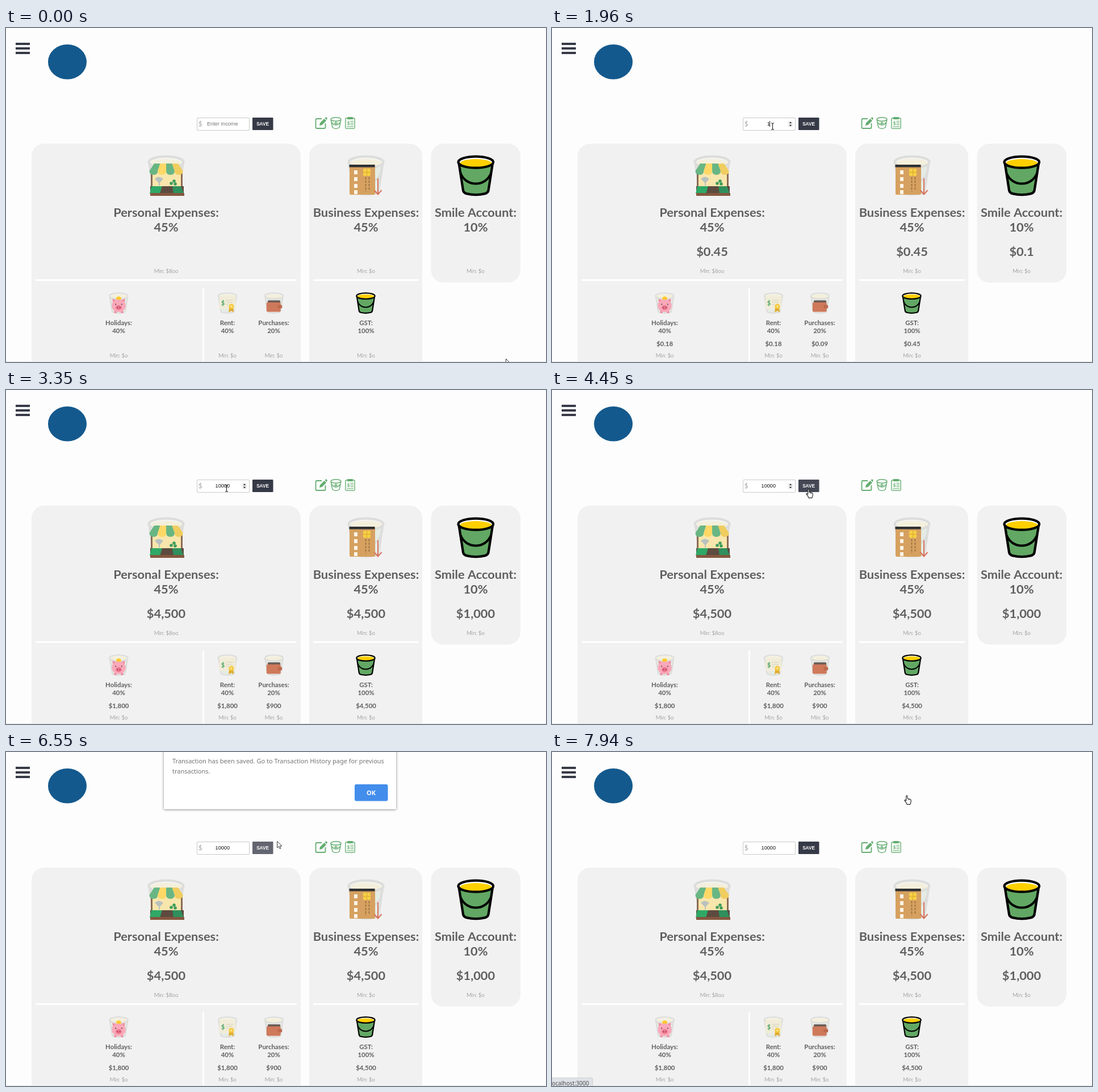
Recreate the animation shown at these times as an HTML page with a canvas. Size 951 by 589 pixels, loop 8 s.

```html
<!DOCTYPE html>
<html lang="en">
<head>
<meta charset="utf-8">
<title>Income buckets</title>
<style>
html, body { margin: 0; width: 100%; height: 100%; overflow: hidden; background: #fdfdfd; }
canvas { display: block; }
</style>
</head>
<body>
<canvas id="stage" width="951" height="589"></canvas>
<script>
const c = document.getElementById('stage').getContext('2d');
const LOOP = 8000;
const DARK = '#363a47', GREEN = '#62a864', INK = '#5f5f5f', PAGE = '#fdfdfd';
const HEAD = 'Lato, sans-serif', FORM = '"Liberation Sans", Arial, sans-serif', NOTE = '"Noto Sans", sans-serif';

// ---- helpers ----
function rect(x, y, w, h, color, r = 0) {
  c.fillStyle = color;
  c.beginPath();
  c.roundRect(x, y, w, h, r);
  c.fill();
}
function oval(x, y, rx, ry, color) {
  c.fillStyle = color;
  c.beginPath();
  c.ellipse(x, y, rx, ry, 0, 0, 7);
  c.fill();
}
function shape(d, fill, stroke, width = 1) {
  const p = new Path2D(d);
  if (fill) { c.fillStyle = fill; c.fill(p); }
  if (stroke) { c.strokeStyle = stroke; c.lineWidth = width; c.stroke(p); }
}
function text(s, x, y, font, color, align = 'center') {
  c.font = font;
  c.fillStyle = color;
  c.textAlign = align;
  c.fillText(s, x, y);
}
function at(x, y, scale, draw) {
  c.save();
  c.translate(x, y);
  c.scale(scale, scale);
  draw();
  c.restore();
}

// ---- icons, on a 66 x 72 grid ----
function bucket(line, body, rim, fill) {
  c.lineJoin = 'round';
  shape('M3.5 14L11 62Q12 66 17 67.5Q33 71.5 49 67.5Q54 66 55 62L62.5 14Z', body, line, 4.2);
  shape('M6.5 32C16 56 50 56 59.5 32', null, line, 4);
  oval(33, 12.5, 30.5, 10, rim);
  oval(33, 14.5, 28, 7.5, fill);
  shape('M2.5 12.5A30.5 10 0 0 1 63.5 12.5A30.5 10 0 0 1 2.5 12.5Z', null, line, 4.2);
}
const fullBucket = () => bucket('#000', GREEN, '#fff', '#ffd000');
const fadedBucket = () => bucket('#dcdddb', '#e5ebe4', '#f3f3f0', '#f3efdb');

function shop() {
  fadedBucket();
  rect(8, 30, 52, 37, '#f8e6ac');
  rect(6, 30, 3, 37, '#8a6b55');
  rect(59, 30, 3, 37, '#8a6b55');
  shape('M13 42Q20 35 28 42L21 50ZM20 48h2v6h-2Z', '#b9c2c0');
  for (const [x, y] of [[42, 50], [47, 46], [49, 51]]) oval(x, y, 2.8, 2.8, '#3f9d5c');
  rect(5, 55, 59, 13, '#5d4b40');
  shape('M7 55H26L22 68H4Z', '#2fa866');
  shape('M44 55H59L64 68H46Z', '#2f8f5c');
  rect(5, 67, 60, 5, '#85573f');
  for (let i = 0; i < 4; i++) {
    const a = 3.5 + i * 14.8, top = 12 + i * 10.5;
    shape(`M${top} 15H${top + 10.5}L${a + 14.8} 28Q${a + 14.8} 35 ${a + 7.4} 35Q${a} 35 ${a} 28Z`,
      i % 2 ? (i > 2 ? '#f0cd5f' : '#ffd866') : '#68b683');
  }
}
function card() {
  fadedBucket();
  rect(4, 17, 45, 53, '#d6a160', 2);
  rect(3.5, 17, 45, 4.5, '#2f3032');
  rect(28, 24, 13, 13, '#f6cf45', 2);
  shape('M28 30.5H41M34.5 24V37', null, '#d8a92f');
  for (const y of [27, 39, 51, 62]) rect(12, y, 6, 7, '#fbf3e6');
  c.setLineDash([4, 2]);
  shape('M32.5 39V64M38.5 39V62', null, '#8d673a', 1.4);
  c.setLineDash([]);
  shape('M54 41V69M47.5 62L54 69.5L60.5 62', null, '#d8735c', 2);
}
function pig() {
  fadedBucket();
  oval(33, 21, 8, 7, '#ffc928');
  shape('M12 22L24 25L14 37ZM54 22L42 25L52 37Z', '#f08ca2');
  rect(18, 60, 8, 10, '#f08ca2', 3);
  rect(40, 60, 8, 10, '#f08ca2', 3);
  oval(33, 45, 23, 21, '#f9a9ba');
  oval(33, 51, 10, 8, '#ee7890');
  oval(29, 51, 2, 3, '#a8455c');
  oval(37, 51, 2, 3, '#a8455c');
  oval(23, 40, 2, 2, '#5b3a42');
  oval(43, 40, 2, 2, '#5b3a42');
}
function lease() {
  fadedBucket();
  rect(6, 14, 54, 42, '#f0ecd8', 4);
  shape('M28 27H52M28 34H50M28 41H36', null, '#d3cfb8', 2);
  text('$', 18, 43, '700 20px ' + HEAD, '#3f9d5c');
  shape('M39 50L37 67L46 62L54 67L52 50Z', '#e0ac2e');
  oval(46, 47, 8.5, 8.5, '#f5c83a');
  oval(46, 47, 4, 4, '#fbe083');
}
function wallet() {
  fadedBucket();
  rect(12, 27, 42, 12, '#6d5d58', 3);
  rect(8, 34, 47, 31, '#cf795b', 4);
  rect(45, 42, 15, 12, '#bd6a50', 4);
}

function toolIcons() {
  const tint = '#64ac70';
  c.lineJoin = 'round';
  shape('M556 160H547.5Q545.5 160 545.5 162V175Q545.5 177 547.5 177H560.5Q562.5 177 562.5 175V168', null, tint, 1.8);
  shape('M552 172L553 167.5L560.5 160L564 163.5L556.5 171ZM561.5 159L563 157.5Q565 157 565.5 158.5Q566 160 565 161.5L564.7 162.2Z', tint);
  shape('M572 161A9 3.2 0 0 1 590 161A9 3.2 0 0 1 572 161L575 175.5Q581 179.5 587 175.5L590 161M573 166Q581 176 589 166M581 164.5V171M577.8 167.8H584.2', null, tint, 1.4);
  shape('M599.5 159H612.5Q614.2 159 614.2 161V175.5Q614.2 177.3 612.5 177.3H599.5Q597.8 177.3 597.8 175.5V161Q597.8 159 599.5 159Z', '#f4faf4', tint, 1.3);
  rect(601, 157, 10, 4, tint, 1);
  shape('M606.5 164.5H612M606.5 167.5H612M606.5 170.5H612M600.5 174H612', null, tint, 1.2);
  text('$', 603, 170.5, '700 8px ' + HEAD, tint);
}

// ---- timeline ----
function stepped(t, t0, t1, n) {
  if (t < t0) return 0;
  if (t1 === t0) return 1;
  return Math.min(1, (Math.floor((t - t0) / (t1 - t0) * (n - 1) + 1e-6) + 1) / n);
}
const ease = p => p * p * (3 - 2 * p);

// start, end, steps, x, y, pointer
const MOVES = [
  [70, 770, 10, 394, 181, 'arrow'],
  [940, 1000, 2, 390, 173, 'beam'],
  [1170, 1240, 2, 388.5, 173.5, 'beam'],
  [3900, 3960, 2, 453, 184, 'arrow'],
  [4130, 4290, 3, 447, 174, 'hand'],
  [5380, 5380, 1, 447, 172, 'hand'],
  [6460, 7040, 8, 640, 76, 'arrow'],
  [7110, 7180, 2, 643, 70, 'hand'],
  [7250, 7250, 1, 642, 71, 'hand'],
  [7330, 7410, 2, 626, 72, 'hand'],
  [7650, 7650, 1, 625, 73, 'hand'],
  [7940, 7940, 1, 620, 76, 'hand']
];
const KEYS = [1960, 2190, 2340, 2650, 2800];

const POINTERS = {
  arrow() { shape('M.5 .5V12L3.2 9.5L5 13.6L6.9 12.8L5.1 8.8H8.8Z', '#fff', '#222', 0.9); },
  beam() { shape('M-2.5 -5.5H-.8L0 -5L.8 -5.5H2.5M0 -5V5M-2.5 5.5H-.8L0 5L.8 5.5H2.5', null, '#222', 1.1); },
  hand() {
    shape('M3.7 1.6Q4.8 -.2 5.9 1.6V6L10.7 7.2Q12.3 7.8 12.2 9.3V12L10.8 16.4H5L4 13.7L.9 9.7Q1 7.8 2.5 8.8L3.7 10Z', '#fff', '#222', 1.1);
    shape('M8 7V9M10.2 7.5V9.2', null, '#222', 0.8);
  }
};

function pointer(t) {
  let x = 880, y = 583, kind = 'arrow';
  for (const [t0, t1, n, tx, ty, k] of MOVES) {
    if (t < t0) break;
    let p = stepped(t, t0, t1, n);
    if (n > 2) p = ease(p);
    x += (tx - x) * p;
    y += (ty - y) * p;
    kind = k;
  }
  at(x, y, 1, POINTERS[kind]);
}

// ---- page parts ----
const money = v => '$' + v.toLocaleString('en-US', { maximumFractionDigits: 2 });

function account(x, name, share, income, min) {
  const font = '700 21.8px ' + HEAD;
  text(name + ':', x, 333, font, INK);
  text(share * 100 + '%', x, 359, font, INK);
  if (income) text(money(income * share), x, 402, font, INK);
  text('Min: $' + min, x, 432, '300 9.5px ' + HEAD, '#666');
}
function subAccount(x, name, share, parent, income) {
  const font = '700 11.4px ' + HEAD;
  text(name + ':', x, 523.5, font, INK);
  text(share * 100 + '%', x, 537.5, font, INK);
  if (income) text(money(income * parent * share), x, 560.5, font, INK);
  text('Min: $o', x, 580.5, '300 9.5px ' + HEAD, '#666');
}

function board(income) {
  rect(45, 204, 474, 420, '#f1f1f1', 22);
  rect(534, 204, 199, 420, '#f1f1f1', 22);
  rect(748.5, 204, 157.5, 245, '#f1f1f1', 22);
  rect(52, 443, 460, 3, '#fff');
  rect(541, 443, 186, 3, '#fff');
  rect(346, 459, 3, 130, '#fff');

  at(249, 224, 1, shop);
  at(601, 224, 1, card);
  at(794, 224, 1.01, fullBucket);
  at(181, 466, 0.53, pig);
  at(372.5, 466, 0.53, lease);
  at(454.5, 466, 0.53, wallet);
  at(616, 466, 0.53, fullBucket);

  account(282, 'Personal Expenses', 0.45, income, '8oo');
  account(634, 'Business Expenses', 0.45, income, 'o');
  account(827, 'Smile Account', 0.1, income, 'o');
  subAccount(198.5, 'Holidays', 0.4, 0.45, income);
  subAccount(390, 'Rent', 0.4, 0.45, income);
  subAccount(471.5, 'Purchases', 0.2, 0.45, income);
  subAccount(634, 'GST', 1, 0.45, income);
  rect(0, 588, 951, 1, '#e6e6e6');
}

function saveAlpha(t) {
  if (t < 4380 || t >= 7410) return 1;
  if (t >= 6460) return 0.77;
  return 1 - 0.3 * Math.min(1, (t - 4380) / 300);
}

function incomeForm(t, value) {
  const font = '9.2px ' + FORM;
  rect(336, 158, 93, 23, '#c9c9c9', 2);
  rect(337, 159, 91, 21, '#fff', 1);
  text('$', 338.5, 172.5, '300 12.5px ' + HEAD, '#666', 'left');
  text(value || 'Enter Income', 381.3, 172, font, value ? '#111' : '#757575');

  const caretOn = (t >= 1240 && t < 1720) || (t >= 1960 && t < 3350) || (t >= 3900 && t < 4300);
  if (caretOn) {
    c.font = font;
    rect(Math.round(381.3 + c.measureText(value).width / 2 - 0.5), 164, 1, 10, '#222');
  }
  if (t >= 940 && t < 4830) {
    rect(415.5, 164, 9, 10.5, '#efefef');
    shape('M417.7 168L420 165.3L422.3 168ZM417.7 170.7L420 173.4L422.3 170.7Z', '#333');
  }

  c.globalAlpha = saveAlpha(t);
  rect(434, 158, 36.5, 22, DARK, 1);
  c.globalAlpha = 1;
  text('SAVE', 452, 172, '700 8.2px ' + FORM, '#fff');
}

// Shadow is clipped to the outside so a fading panel stays white.
function panel(x, y, w, h) {
  c.save();
  c.beginPath();
  c.rect(0, -100, 951, 689);
  c.rect(x, y, w, h);
  c.clip('evenodd');
  c.shadowColor = 'rgba(0,0,0,.5)';
  c.shadowBlur = 4;
  c.shadowOffsetY = 1;
  rect(x, y, w, h, '#fff', 2);
  c.restore();
  rect(x, y, w, h, '#fff', 2);
}

function dialog(t) {
  if (t < 6070 || t >= 7410) return;
  const [dy, alpha, scale] =
    t < 6150 ? [-6, 0.34, 1.005] :
    t < 6230 ? [2, 0.8, 1.002] :
    t < 7330 ? [0, 1, 1] : [-3, 0.4, 1.003];
  c.save();
  c.globalAlpha = alpha;
  c.translate(482.5, dy);
  c.scale(scale, scale);
  c.translate(-482.5, 0);
  panel(278, -40, 409, 140.5);
  const font = '11px ' + NOTE;
  text('Transaction has been saved. Go to Transaction History page for previous', 293, 19.8, font, '#747474', 'left');
  text('transactions.', 293, 38, font, '#747474', 'left');
  rect(614, 57, 58.5, 29.5, '#438dec', 3);
  text('OK', 643, 75.8, '600 11px ' + NOTE, '#fff');
  c.restore();
}

function statusBar(t) {
  if (t < 7410) return;
  rect(-5, 574, 77, 20, '#cfd2d6', 3);
  rect(-5, 575, 76, 20, '#dfe2e6', 3);
  text('localhost:3000', -2.6, 588, '10px ' + NOTE, '#4a4d52', 'left');
}

function draw(t) {
  const typed = KEYS.filter(k => t >= k).length;
  const value = '10000'.slice(0, typed);
  rect(0, 0, 951, 589, PAGE);
  for (const y of [26, 34, 42]) rect(17, y, 25, 4, DARK);
  oval(108, 59.7, 34, 30.8, '#14598d');
  incomeForm(t, value);
  toolIcons();
  board(Number(value));
  dialog(t);
  statusBar(t);
  pointer(t);
}

const start = performance.now();
function tick() {
  draw((performance.now() - start) % LOOP);
  requestAnimationFrame(tick);
}
tick();
</script>
</body>
</html>
```
